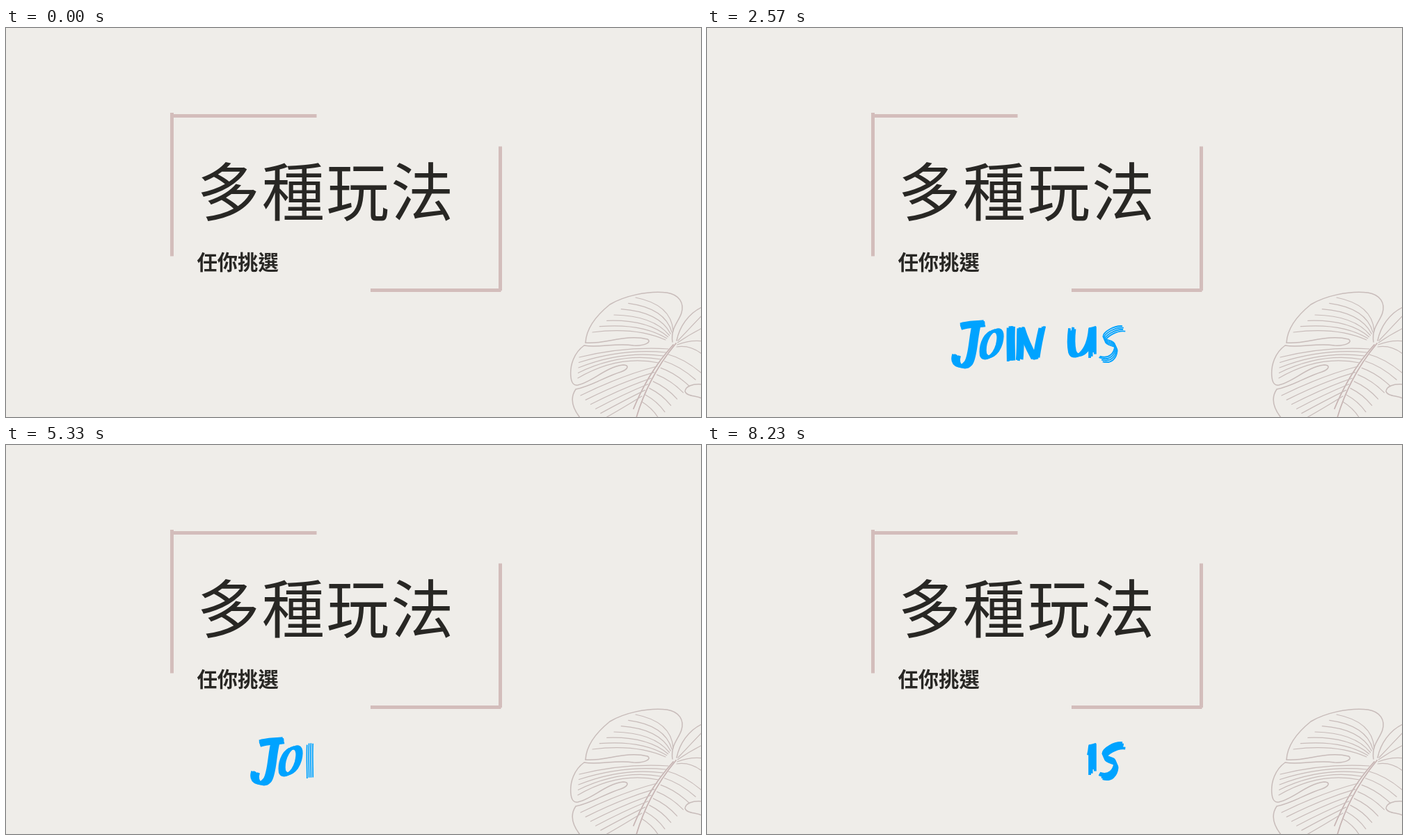
These frames come from a looping animation (999 px wide and 560 px high, 8.26 s). An HTML page:

```html
<!DOCTYPE html>
<html lang="zh-TW">
<head>
<meta charset="utf-8">
<style>
  html, body { margin: 0; width: 100%; height: 100%; overflow: hidden; background: #efede9; }
  svg { display: block; width: 999px; height: 560px; }
  text { font-family: "Noto Sans CJK TC", "Noto Sans CJK", "Noto Sans CJK JP", sans-serif; fill: #282724; }
  .corner { fill: none; stroke: #d3bdbb; stroke-width: 5; }
  #leaf { fill: none; stroke: #c8bcba; stroke-width: 1.5; stroke-linecap: round; }
  #veins { stroke-width: 1.2; }
  #lettering { fill: none; stroke: #00a3ff; stroke-linejoin: round; }
</style>
</head>
<body>
<svg viewBox="0 0 999 560">
  <rect width="999" height="560" fill="#efede9"/>
  <g id="leaf">
    <path d="M833 453C834 434 847 415 868 398C888 386 921 378 950 381C968 384 975 396 971 410C967 423 955 432 958 452"/>
    <path d="M964 450C968 430 981 411 1000 402"/>
    <path d="M833 453C860 456 890 440 922 448C929 452 918 458 902 457C875 453 852 461 831 457C817 467 810 485 812 503C813 511 816 515 822 514C842 510 862 488 887 485C896 485 895 491 884 495C861 502 841 516 819 520C810 533 815 548 825 561"/>
    <path d="M1000 513C986 512 977 516 976 523C978 530 990 529 1000 533"/>
    <path d="M963 454C938 484 918 520 906 561M959 456C937 481 919 507 902 548" stroke="#c6b3b2" stroke-width="1.7"/>
    <g id="veins"></g>
  </g>
  <g class="corner">
    <path d="M238.5 122V328.5M238 126.5H446.5"/>
    <path d="M710.5 170.5V378M524 377.5H711.5"/>
  </g>
  <text x="274.7" y="269.5" font-size="90.5" letter-spacing="2.3">多種玩法</text>
  <text x="274.5" y="347.7" font-size="29.3" font-weight="700">任你挑選</text>
  <g id="lettering"></g>
</svg>
<script>
const LOOP = 8260, CYCLE = 4130;
const DRAW_START = 430, DRAW_STEP = 340, DRAW_TIME = 220;
const ERASE_START = 3335, ERASE_STEP = 165, ERASE_TIME = 180;
const BRISTLES = 4, BRISTLE_WIDTH = 3.8;

const clamp = v => Math.max(0, Math.min(1, v));
const mix = (a, b, k) => a + (b - a) * k;
const noise = n => { const v = Math.sin(n * 78.233) * 43758.5453; return v - Math.floor(v); };

function addPath(parent, d) {
  const path = document.createElementNS('http://www.w3.org/2000/svg', 'path');
  path.setAttribute('d', d);
  parent.appendChild(path);
  return path;
}

// Leaf veins: each fan blends from one quadratic curve to another.
const veins = document.getElementById('veins');
function fan(from, to, count) {
  for (let i = 0; i < count; i++) {
    const p = from.map((v, j) => mix(v, to[j], i / (count - 1)).toFixed(1));
    addPath(veins, `M${p[0]} ${p[1]}Q${p[2]} ${p[3]} ${p[4]} ${p[5]}`);
  }
}
fan([948, 449, 905, 430, 843, 438], [959, 436, 956, 398, 905, 388], 7);
fan([952, 462, 890, 458, 824, 474], [938, 482, 880, 470, 822, 504], 5);
fan([936, 487, 885, 500, 826, 529], [914, 530, 890, 545, 862, 561], 6);
fan([966, 450, 980, 435, 1000, 414], [964, 459, 983, 456, 1000, 469], 4);
fan([952, 470, 975, 476, 1000, 497], [914, 538, 930, 548, 938, 562], 8);

// Each stroke is a path with the half-width vector of its brush.
const letters = [
  [['M359 470C353 485 367 494 376 482C383 471 382 445 388 425', 4.4, 1],
   ['M364 430C374 426 387 427 400 425', 0.6, 3.2]],
  [['M414 435C401 439 395 457 397 470C401 480 415 472 420 455C424 439 420 431 409 438', 3.2, -1.2]],
  [['M437 429C436 447 437 463 437 480', 4.2, -.8]],
  [['M451 430C450 446 451 462 449 479', 3.5, -.8],
   ['M452 432C457 449 464 463 471 476', 3, -.8],
   ['M482 430C478 447 475 462 473 477', 3.3, -.8]],
  [['M525 431C523 446 523 457 525 466C530 480 551 468 554 432L554 474', 3.9, -1]],
  [['M600 433C588 431 571 441 571 448C573 455 588 452 588 461C587 473 578 482 563 475', 1.6, 3.7]]
];

const lettering = document.getElementById('lettering');
const brushes = letters.map((strokes, letter) => strokes.flatMap(([d, nx, ny], s) =>
  Array.from({ length: BRISTLES }, (_, i) => {
    const offset = i / (BRISTLES - 1) * 2 - 1;
    const seed = letter * 31 + s * 11 + i + 1;
    const path = addPath(lettering, d);
    path.setAttribute('pathLength', 1);
    path.setAttribute('transform', `translate(${nx * offset} ${ny * offset})`);
    return { path, head: noise(seed) * .04, tail: 1 - noise(seed + 7) * .05 };
  })));

function showLetter(bristles, drawn, erased) {
  const width = BRISTLE_WIDTH * (.35 + .65 * drawn * drawn);
  for (const { path, head, tail } of bristles) {
    const start = Math.max(head, erased);
    const length = Math.min(tail, drawn * 2.4) - start;
    const visible = drawn > 0 && erased < 1 && length > 0;
    path.setAttribute('visibility', visible ? 'visible' : 'hidden');
    if (!visible) continue;
    path.setAttribute('stroke-width', width);
    path.setAttribute('stroke-dasharray', `${length} 2`);
    path.setAttribute('stroke-dashoffset', -start);
  }
}

function render(time) {
  // The last erase runs on into the pause before the next cycle.
  const phase = time < CYCLE + 270 ? time : time - CYCLE;
  brushes.forEach((bristles, i) => {
    const slot = i > 3 ? i + 1 : i; // the word gap takes one slot
    const drawn = clamp((phase - DRAW_START - slot * DRAW_STEP) / DRAW_TIME);
    const erased = clamp((phase - ERASE_START - i * ERASE_STEP) / ERASE_TIME);
    showLetter(bristles, drawn, erased);
  });
}

const begin = performance.now();
function tick() {
  render((performance.now() - begin) % LOOP);
  requestAnimationFrame(tick);
}
tick();
</script>
</body>
</html>
```
